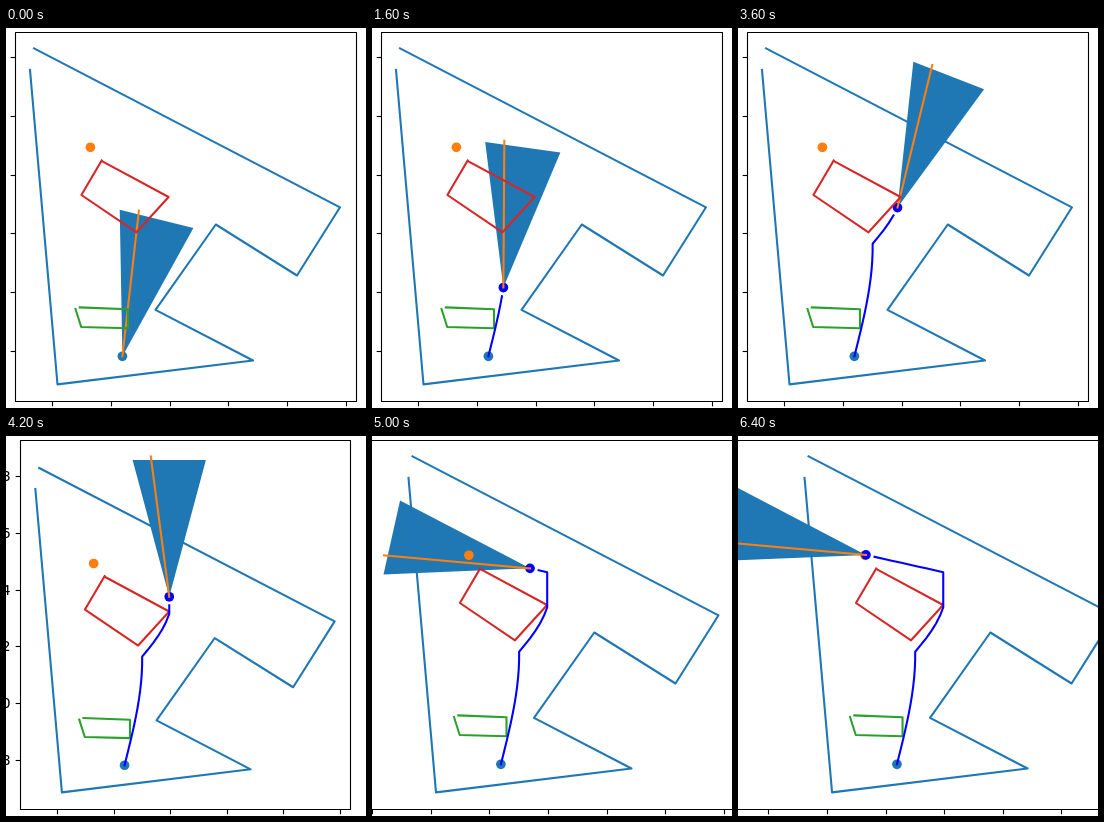
Write an HTML page with a canvas that moves like this. It is 360x380 px and loops after 6.6 s.

```html
<!DOCTYPE html>
<html>
<head>
<meta charset="utf-8">
<style>
html, body { margin: 0; width: 100%; height: 100%; overflow: hidden; background: #fff; }
canvas { display: block; }
</style>
</head>
<body>
<canvas id="plot" width="360" height="380"></canvas>
<script>
const ctx = document.getElementById('plot').getContext('2d');
const BLUE = '#1f77b4', ORANGE = '#ff7f0e', GREEN = '#2ca02c', RED = '#d62728', TRAIL = '#0000ff';
const STEPS = 33, STEP_MS = 200;
const UNIT = 29.33, RANGE = 5 * UNIT, STRIDE = 0.3 * UNIT;
const CENTER = [179, 188.4], HEIGHT = 369.6, MARGIN = 1.1;
const TICK = 4.86;

const room = [[28, 20.4], [334, 179.3], [291, 247.5], [209.8, 196.5], [149.5, 281.8],
  [247, 332.5], [51.5, 356.4], [24, 42]];
const redBox = [[95.7, 132.5], [75.4, 167], [130.5, 204.3], [162.6, 169], [97.3, 133.8]];
const greenBox = [[73.8, 279.4], [122, 281.2], [122, 300.2], [75.2, 299], [69.5, 281]];
const start = [116.4, 328.3], goal = [84.4, 119.3];

// Heading in degrees, clockwise from straight up.
function heading(n) {
  if (n < 13) return 13.95 - 0.095 * n * n;
  if (n < 19) { const k = n - 13; return 39.7 - 0.9 * k - 0.56 * k * k; }
  return n < 23 ? 0 : -77.4;
}

function ahead([x, y], degrees, distance) {
  const a = degrees * Math.PI / 180;
  return [x + distance * Math.sin(a), y - distance * Math.cos(a)];
}

const route = [start];
for (let n = 0; n < STEPS - 1; n++) route.push(ahead(route[n], heading(n), STRIDE));

const snap = v => Math.floor(v + 0.5) + 0.5;

// Fits the view to the data with equal aspect, the box staying centred.
function fitView(points) {
  const extent = axis => {
    const values = points.map(p => p[axis]);
    return [Math.min(...values), Math.max(...values)];
  };
  const [x0, x1] = extent(0), [y0, y1] = extent(1);
  const scale = HEIGHT / (MARGIN * (y1 - y0));
  const halfWidth = MARGIN * (x1 - x0) * scale / 2;
  return {
    left: CENTER[0] - halfWidth, right: CENTER[0] + halfWidth,
    top: CENTER[1] - HEIGHT / 2, bottom: CENTER[1] + HEIGHT / 2,
    map: ([x, y]) => [CENTER[0] + (x - (x0 + x1) / 2) * scale,
                      CENTER[1] + (y - (y0 + y1) / 2) * scale]
  };
}

function trace(points) {
  ctx.beginPath();
  points.forEach(p => ctx.lineTo(...p));
}

function line(points, color, width = 2.08) {
  trace(points);
  ctx.strokeStyle = color;
  ctx.lineWidth = width;
  ctx.stroke();
}

function dot([x, y], color) {
  ctx.beginPath();
  ctx.arc(x, y, 4.85, 0, 2 * Math.PI);
  ctx.fillStyle = color;
  ctx.fill();
}

function drawAxes(view) {
  const left = snap(view.left), right = snap(view.right);
  const top = snap(view.top), bottom = snap(view.bottom);
  ctx.lineCap = 'butt';
  ctx.fillStyle = '#000';
  ctx.font = '13.89px "DejaVu Sans", sans-serif';
  ctx.textAlign = 'right';
  for (let k = -3; k < 9; k++) {
    const [tx, ty] = view.map([46.3 + 2 * UNIT * k, 29.2 + 2 * UNIT * k]);
    if (tx > view.left && tx < view.right) {
      line([[snap(tx), bottom], [snap(tx), bottom + TICK]], '#000', 1.11);
    }
    if (ty > view.top && ty < view.bottom) {
      line([[left, snap(ty)], [left - TICK, snap(ty)]], '#000', 1.11);
      ctx.fillText(18 - 2 * k, view.left - 2 * TICK, ty + 5);
    }
  }
  ctx.lineWidth = 1.11;
  ctx.strokeRect(left, top, right - left, bottom - top);
}

function draw(n) {
  const robot = route[n], h = heading(n);
  const cone = [robot, ahead(robot, h - 15, RANGE), ahead(robot, h + 15, RANGE)];
  const ray = [robot, ahead(robot, h - 7.5, RANGE)];
  const view = fitView([...room, ...cone, ...ray]);
  const plot = (points, color) => line(points.map(view.map), color);

  ctx.fillStyle = '#fff';
  ctx.fillRect(0, 0, 360, 380);
  ctx.lineCap = 'square';
  ctx.lineJoin = 'round';

  trace(cone.map(view.map));
  ctx.fillStyle = BLUE;
  ctx.fill();
  dot(view.map(start), BLUE);
  dot(view.map(goal), ORANGE);
  if (n > 0) dot(view.map(robot), TRAIL);

  plot(room, BLUE);
  plot(ray, ORANGE);
  plot(greenBox, GREEN);
  plot(redBox, RED);
  if (n > 1) plot(route.slice(0, n), TRAIL);
  drawAxes(view);
}

function tick() {
  draw(Math.floor(performance.now() / STEP_MS) % STEPS);
  requestAnimationFrame(tick);
}
tick();
</script>
</body>
</html>
```
